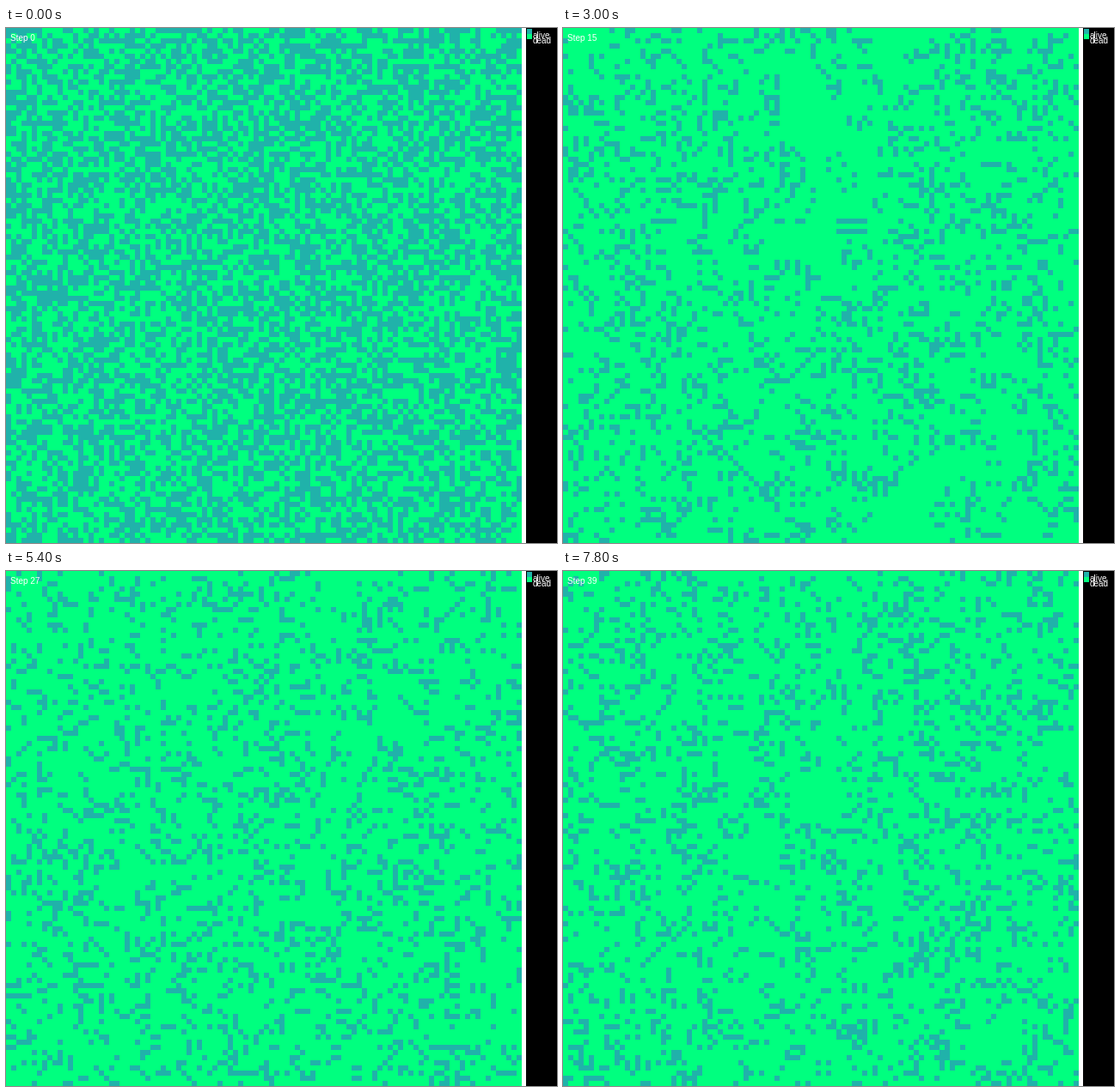
Animation of 641 by 600 pixels, one loop 8000 ms. Source, as a matplotlib script:

```python
import matplotlib.pyplot as plt
import numpy as np
from matplotlib.animation import FuncAnimation
from matplotlib.patches import Rectangle

W, H, DPI = 641, 600, 100
CELLS, STEPS, STEP_MS = 100, 40, 200
ALIVE, DEAD = "#20b2aa", "#00ff7f"
COLORS = np.array([[0, 255, 127], [32, 178, 170]], dtype=np.uint8)


def evolve(grid):
    """A dead cell with exactly two live neighbours is born; live cells die."""
    near = sum(np.roll(grid, (dy, dx), (0, 1))
               for dy in (-1, 0, 1) for dx in (-1, 0, 1) if dx or dy)
    return ((grid == 0) & (near == 2)).astype(int)


grids = [np.random.default_rng(7).integers(0, 2, (CELLS, CELLS))]
while len(grids) < STEPS:
    grids.append(evolve(grids[-1]))

fig = plt.figure(figsize=(W / DPI, H / DPI), dpi=DPI, facecolor="white")
ax = fig.add_axes([0, 0, 1, 1])
board = ax.imshow(COLORS[grids[0]], extent=(0, 600, 600, 0),
                  interpolation="nearest", aspect="auto")
ax.set_xlim(0, W)
ax.set_ylim(H, 0)
ax.axis("off")


def box(x, y, w, h, color):
    ax.add_patch(Rectangle((x, y), w, h, fc=color, lw=0, antialiased=False))


def label(x, y, text):
    return ax.text(x, y, text, color="white", family="Liberation Sans",
                   size=10 * 72 / DPI, va="baseline", zorder=5)


box(605, 0, 36, 600, "black")
box(606, 1, 6, 6, ALIVE)
box(606, 7, 6, 6, DEAD)
label(612.5, 12, "alive")
label(612.5, 18, "dead")
counter = label(5, 15, "")


def draw(step):
    board.set_data(COLORS[grids[step]])
    counter.set_text(f"Step {step}")
    return board, counter


anim = FuncAnimation(fig, draw, frames=STEPS, interval=STEP_MS,
                     repeat=True, repeat_delay=0)
plt.show()
```
